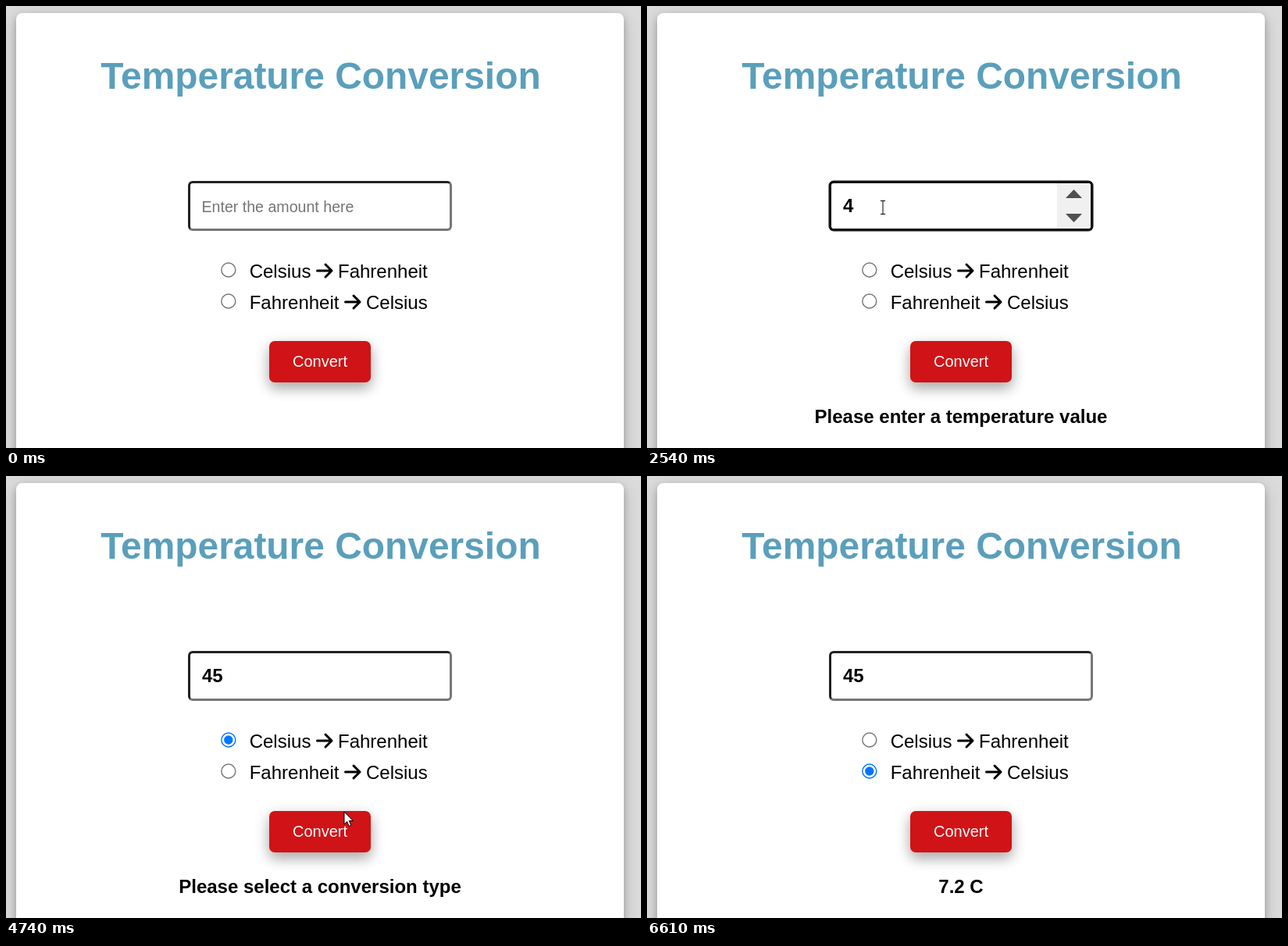
Write an HTML page that moves like this. It is 813 px wide and 566 px high and loops after 7210 ms.

```html
<!DOCTYPE html>
<html lang="en">
<head>
<meta charset="utf-8">
<title>Temperature Conversion</title>
<style>
  html, body { margin: 0; width: 100%; height: 100%; overflow: hidden; }
  body { position: relative; background: #dbdbdb; font-family: "Liberation Sans", Arial, sans-serif; }
  div, svg { position: absolute; box-sizing: border-box; }
  #card {
    left: 13px; top: 9px; width: 778px; height: 640px; border-radius: 8px; background: #fff;
    box-shadow: 0 4px 8px rgba(0, 0, 0, .2), 0 6px 20px rgba(0, 0, 0, .19);
  }
  #field {
    left: 233px; top: 224px; width: 338px; height: 64px; border: 3px solid;
    border-color: #222 #767676 #767676 #222; border-radius: 6px; background: #fff;
  }
  #field.focus { border-color: #101010; box-shadow: 0 0 0 .5px #101010; }
  #button {
    left: 337px; top: 429px; width: 130px; height: 53px; border-radius: 7px; background: #d01316;
    box-shadow: 0 8px 16px rgba(0, 0, 0, .2), 0 6px 20px rgba(0, 0, 0, .19);
  }
  #button.hover { background: #f00; }
  svg { left: 0; top: 0; }
  text { font-size: 24px; white-space: pre; }
  .bold { font-weight: bold; }
  .middle { text-anchor: middle; }
  .arrow { fill: none; stroke: #000; stroke-width: 3; stroke-linecap: round; stroke-linejoin: round; }
  .row { --tone: #767676; }
  .row.hover { --tone: #444; }
  .row.checked { --tone: #0075ff; }
  .row.checked.hover { --tone: #005cc8; }
  .ring { fill: #fff; stroke: var(--tone); stroke-width: 1.4; }
  .dot { fill: var(--tone); visibility: hidden; }
  .checked .dot { visibility: visible; }
  #cursor path { fill: #fff; stroke: #000; stroke-linejoin: round; }
  #cursor .line { fill: none; }
</style>
</head>
<body>
<div id="card"></div>
<div id="field"></div>
<div id="button"></div>
<svg width="813" height="566" viewBox="0 0 813 566">
  <text class="bold middle" x="403" y="106" fill="#5a9fbc" style="font-size:47.9px">Temperature Conversion</text>

  <text id="placeholder" x="250.5" y="264" fill="#757575" style="font-size:19.6px">Enter the amount here</text>
  <text id="value" class="bold" x="251" y="264"></text>
  <g id="spinner">
    <path d="M525 227h40q3 0 3 3v52q0 3-3 3h-40z" fill="#f0f0f0"/>
    <path d="M536 246l10.5-11 10.5 11zM536 266h21l-10.5 11z" fill="#505050"/>
  </g>

  <g id="rows"></g>

  <text class="middle" x="402" y="462" fill="#fff" style="font-size:20px">Convert</text>
  <text id="message" class="bold middle" x="402" y="534"></text>

  <g id="cursor">
    <g id="pointer"><path d="M0 0V16L3.7 12.6 6.2 18.4 8.8 17.3 6.3 11.6H11.3Z"/></g>
    <g id="hand" transform="translate(-1 -1)">
      <path d="M-1.8 15V1.8Q-1.8 0 0 0T1.8 1.8V7.5Q3.6 6.3 5 8 7 7.2 8.2 9 10.6 8.6 10.6 11V16Q10.6 19 8.6 21.5V24H-1V22Q-4 18-5.8 14.5-6.6 12.6-5 12T-1.8 15Z"/>
      <path class="line" d="M1.8 7.5V12M5 8V12M8.2 9V12.5"/>
    </g>
    <g id="beam"><path class="line" d="M-3-8.5H3M0-8.5V8.5M-3 8.5H3"/></g>
  </g>
</svg>
<script>
  const LOOP = 7210;
  const STEP = 1000 / 15;
  const door = { x: 447, y: 533 };

  const moves = [
    { start: 3, end: 13, x: 410, y: 463 },   // to the button
    { start: 18, end: 24, x: 352, y: 384 },  // to the second label
    { start: 26, end: 33, x: 302, y: 258 },  // into the field
    { start: 42, end: 48, x: 442, y: 440 },  // to the button
    { start: 56, end: 64, x: 286, y: 338 },  // to the first radio
    { start: 67, end: 71, x: 433, y: 430 },  // to the button's edge
    { start: 71, end: 73, x: 433, y: 452 },  // onto the button
    { start: 78, end: 86, x: 288, y: 371 },  // to the second radio
    { start: 86, end: 89, x: 400, y: 448 },  // to the button
    { start: 93, end: 99, x: 602, y: 550 }   // out
  ];
  const ENTER = moves[0].start;
  const LEAVE = moves[moves.length - 1].end;

  const convert = form => {
    form.focused = false;
    if (!form.amount) form.message = "Please enter a temperature value";
    else if (!form.choice) form.message = "Please select a conversion type";
    else if (form.choice === 1) form.message = (form.amount * 1.8 + 32).toFixed(1) + " F";
    else form.message = ((form.amount - 32) / 1.8).toFixed(1) + " C";
  };
  const focus = form => { form.focused = true; };
  const type = digit => form => { form.amount += digit; };
  const choose = row => form => { form.choice = row; };

  const actions = [
    { at: 12, run: convert },
    { at: 32, run: focus },
    { at: 38, run: type("4") },
    { at: 40, run: type("5") },
    { at: 49, run: convert },
    { at: 66, run: choose(1) },
    { at: 75, run: convert },
    { at: 86, run: choose(2) },
    { at: 92, run: convert }
  ];

  const get = id => document.getElementById(id);
  const show = (node, on) => { node.style.display = on ? "" : "none"; };
  const smooth = k => k * k * (3 - 2 * k);

  const row = (from, to, arrowX, y) => `
    <g class="row">
      <circle class="ring" cx="284.8" cy="${y}" r="9"/>
      <circle class="dot" cx="284.8" cy="${y}" r="5.7"/>
      <text x="311.7" y="${y + 10}">${from}</text>
      <path class="arrow" d="M${arrowX + 1.5} ${y + 1}h18.5m-8-8l8 8-8 8"/>
      <text x="${arrowX + 28}" y="${y + 10}">${to}</text>
    </g>`;
  get("rows").innerHTML =
    row("Celsius", "Fahrenheit", 397, 338) + row("Fahrenheit", "Celsius", 433, 378);
  const rows = document.querySelectorAll(".row");

  function cursorAt(step) {
    let { x, y } = door;
    for (const move of moves) {
      if (step <= move.start) break;
      const k = smooth(Math.min(1, (step - move.start) / (move.end - move.start)));
      x += (move.x - x) * k;
      y += (move.y - y) * k;
    }
    return [Math.round(x), Math.round(y)];
  }

  function formAt(step) {
    const form = { amount: "", choice: 0, message: "", focused: false };
    actions.filter(({ at }) => at <= step).forEach(({ run }) => run(form));
    return form;
  }

  function draw(time) {
    const step = Math.floor((time % LOOP + 12) / STEP);
    const form = formAt(step);
    const visible = step >= ENTER && step < LEAVE;
    const [x, y] = cursorAt(step);
    const over = (left, top, right, bottom) =>
      visible && x >= left && x <= right && y >= top && y <= bottom;
    const onButton = over(337, 432, 467, 482);
    const onField = over(233, 224, 571, 288);

    get("message").textContent = form.message;
    get("value").textContent = form.amount;
    show(get("placeholder"), !form.amount);
    show(get("spinner"), form.focused || onField);
    get("field").classList.toggle("focus", form.focused);
    get("button").classList.toggle("hover", onButton);
    rows.forEach((node, i) => {
      const middle = 339 + 40 * i;
      node.classList.toggle("checked", form.choice === i + 1);
      node.classList.toggle("hover", over(275, middle - 14, 540, middle + 14));
    });

    show(get("cursor"), visible);
    get("cursor").setAttribute("transform", `translate(${x} ${y})`);
    show(get("hand"), onButton);
    show(get("beam"), onField);
    show(get("pointer"), !onButton && !onField);
  }

  function tick() {
    draw(performance.now());
    requestAnimationFrame(tick);
  }
  tick();
</script>
</body>
</html>
```
